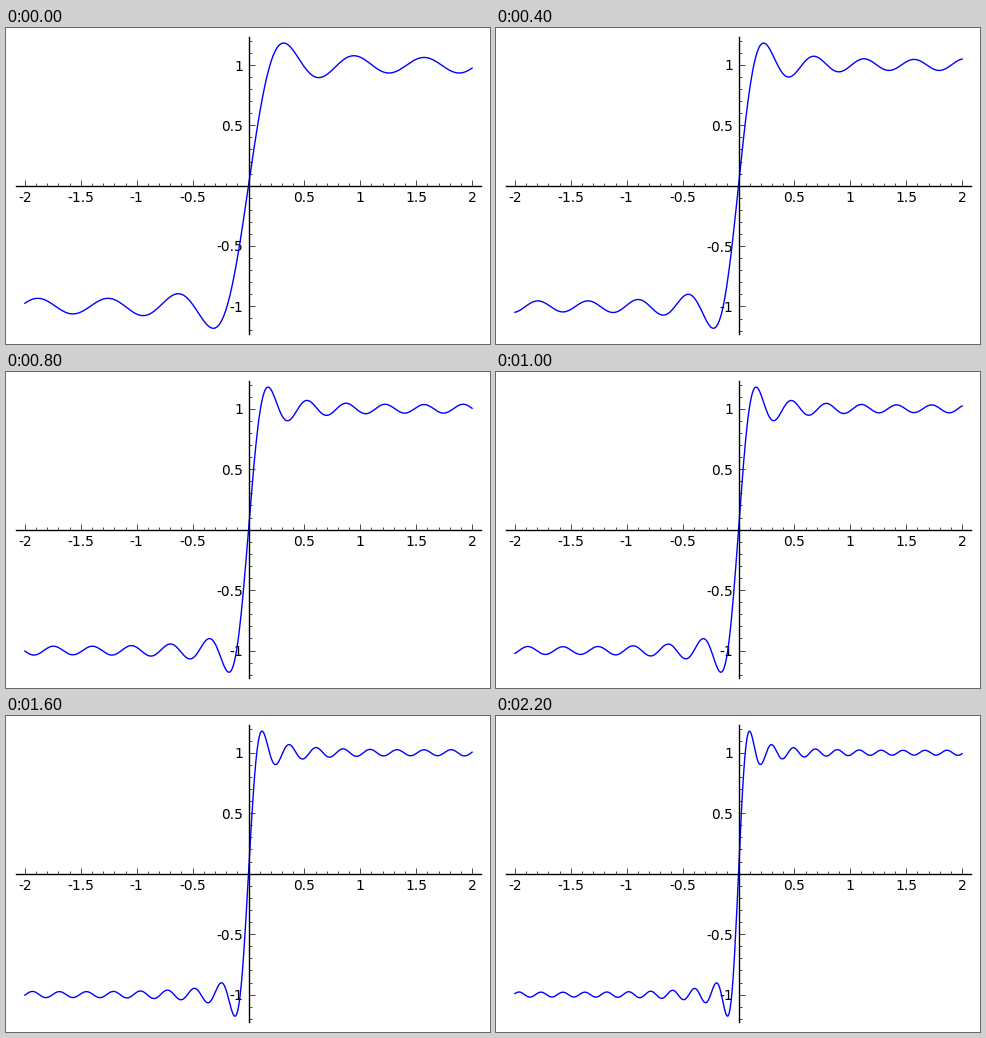
Write a matplotlib script that moves like this. It is 484x316 px and loops after 2400 ms.

```python
import numpy as np
import matplotlib.pyplot as plt
from matplotlib.animation import FuncAnimation
from matplotlib.ticker import FuncFormatter, MultipleLocator

W, H, DPI = 484, 316, 100
AX_W, AX_H, PAD = 465, 296.66, 10
FIRST, LAST = 5, 16

plt.rcParams["font.family"] = "DejaVu Sans"
plt.rcParams["font.size"] = 10


def square_wave(x, terms):
    """Partial Fourier sum of a square wave."""
    k = 2 * np.arange(terms) + 1
    return 4 / np.pi * (np.sin(np.outer(x, k)) / k).sum(axis=1)


def tick_text(value, _):
    return "" if abs(value) < 1e-9 else f"{value:g}"


fig = plt.figure(figsize=(W / DPI, H / DPI), dpi=DPI, facecolor="white")
ax = fig.add_axes([PAD / W, PAD / H, AX_W / W, AX_H / H])
ax.patch.set_visible(False)
ax.set_xlim(-2.08, 2.08)

for side in ("top", "right"):
    ax.spines[side].set_visible(False)
for side in ("bottom", "left"):
    ax.spines[side].set_position("zero")
    ax.spines[side].set_linewidth(1)

for axis in (ax.xaxis, ax.yaxis):
    axis.set_major_locator(MultipleLocator(0.5))
    axis.set_minor_locator(MultipleLocator(0.1))
    axis.set_major_formatter(FuncFormatter(tick_text))
ax.tick_params(which="major", direction="in", length=4, width=0.5, pad=4)
ax.tick_params(which="minor", direction="in", length=2, width=0.5)

x = np.linspace(-2, 2, 400)
curve, = ax.plot([], [], color="#0000ff", lw=1)


def update(i):
    terms = FIRST + i
    curve.set_data(x, square_wave(x, terms))
    peak = square_wave([np.pi / (2 * terms)], terms)[0]
    ax.set_ylim(-1.04 * peak, 1.04 * peak)
    return curve,


anim = FuncAnimation(fig, update, frames=LAST - FIRST + 1, interval=200,
                     repeat=True, repeat_delay=0)
plt.show()
```
